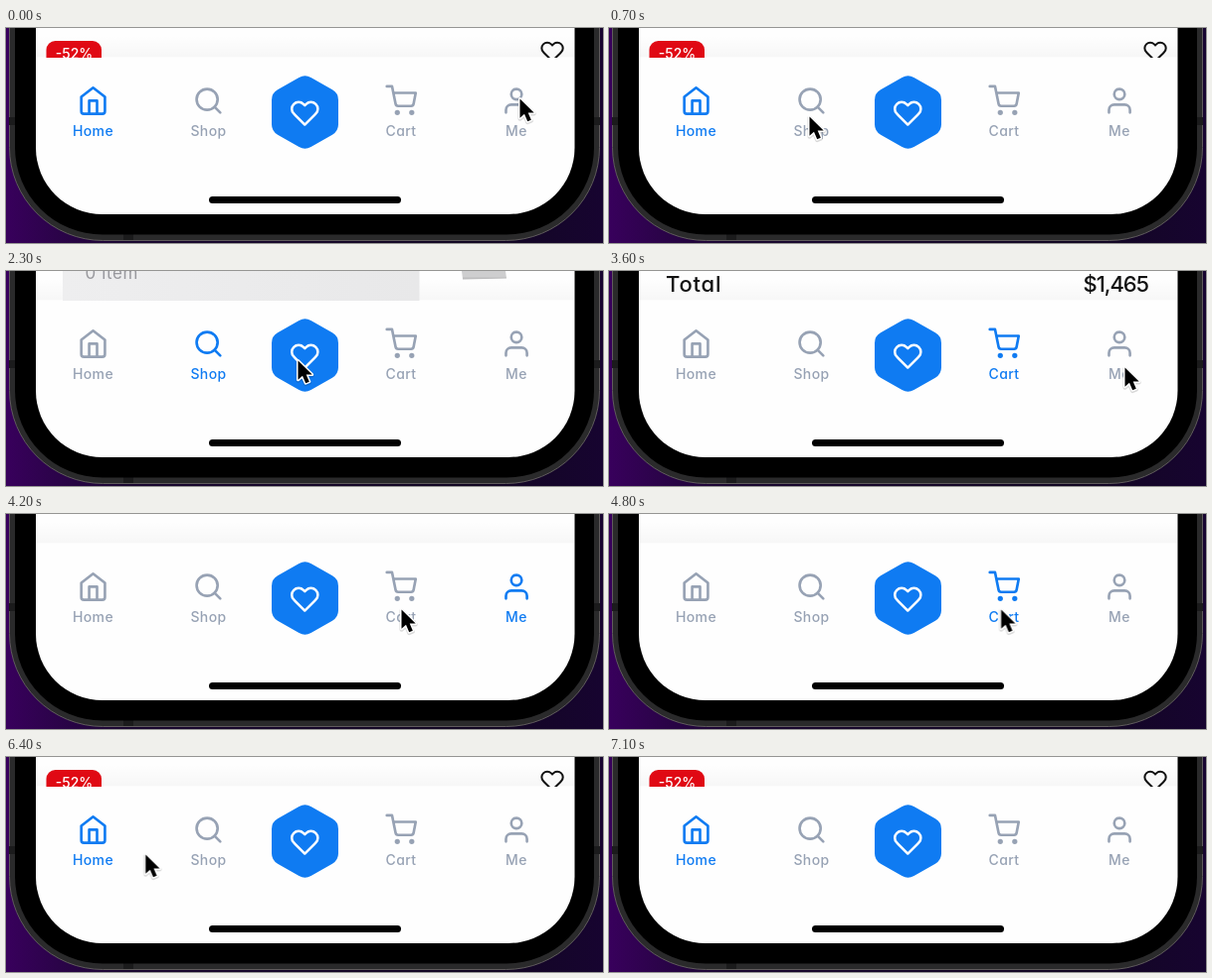
An HTML page for the animation above (8000 ms loop, 600 by 217 pixels).

```html
<!DOCTYPE html>
<html lang="en">
<head>
<meta charset="utf-8">
<title>Tab bar</title>
<style>
  html, body { margin: 0; width: 100%; height: 100%; overflow: hidden; background: #16062c; }
  svg { display: block; width: 600px; height: 217px; }
  text { font-family: Inter, Roboto, sans-serif; font-feature-settings: "cv11"; font-weight: 500; }

  .tab { --on: #0f7bf2; --off: #97a2b4; color: var(--off); animation: 8s step-end infinite; }
  .tab text { font-size: 14px; letter-spacing: .4px; text-anchor: middle; fill: currentColor; }
  .icon { fill: none; stroke: currentColor; stroke-width: 2; stroke-linecap: round; stroke-linejoin: round; }
  .view { animation: 8s step-end infinite; }

  .home { animation-name: home; }
  .shop { animation-name: shop; }
  .cart { animation-name: cart; }
  .me { animation-name: me; }
  @keyframes home { 0%, 77.5% { color: var(--on); } 11.25% { color: var(--off); } 100% { color: var(--on); } }
  @keyframes shop { 0%, 32.5%, 77.5%, 100% { color: var(--off); } 11.25%, 66.25% { color: var(--on); } }
  @keyframes cart { 0%, 46.25%, 66.25%, 100% { color: var(--off); } 32.5%, 55% { color: var(--on); } }
  @keyframes me { 0%, 55%, 100% { color: var(--off); } 46.25% { color: var(--on); } }

  .deals { animation-name: deals; }
  .list { animation-name: list; }
  .total { animation-name: total; }
  @keyframes deals { 0%, 77.5%, 100% { opacity: 1; } 11.25% { opacity: 0; } }
  @keyframes list { 0%, 32.5%, 77.5%, 100% { opacity: 0; } 13.75%, 67.5% { opacity: 1; } }
  @keyframes total { 0%, 46.25%, 100% { opacity: 0; } 37.5% { opacity: 1; } }

  /* The pointer moves ten times a second: one step per 100 ms of each leg. */
  .pointer { animation: travel 8s steps(1) infinite; }
  @keyframes travel {
    0% { transform: translate(515px, 68px); animation-timing-function: steps(7); }
    8.75% { transform: translate(200px, 86px); animation-timing-function: steps(2); }
    11.25% { transform: translate(192px, 83px); }
    22.5% { transform: translate(192px, 83px); animation-timing-function: steps(3); }
    26.25%, 27.5% { transform: translate(286px, 88px); }
    28.75% { transform: translate(292px, 87px); animation-timing-function: steps(3); }
    32.5% { transform: translate(394px, 92px); }
    36.25% { transform: translate(394px, 92px); animation-timing-function: steps(5); }
    42.5% { transform: translate(517px, 94px); }
    47.5% { transform: translate(517px, 94px); animation-timing-function: steps(3); }
    51.25% { transform: translate(400px, 93px); }
    52.5% { transform: translate(396px, 93px); animation-timing-function: steps(7); }
    61.25% { transform: translate(392px, 93px); animation-timing-function: steps(2); }
    63.75% { transform: translate(186px, 93px); }
    65% { transform: translate(186px, 93px); animation-timing-function: steps(4); }
    70% { transform: translate(144.5px, 88px); animation-timing-function: steps(3); }
    73.75% { transform: translate(75px, 92px); }
    78.75% { transform: translate(75px, 92px); animation-timing-function: steps(4); }
    83.75% { transform: translate(330px, 104px); animation-timing-function: steps(3); }
    87.5% { transform: translate(590px, 66px); }
    88.75%, 100% { transform: translate(630px, 60px); }
  }
</style>
</head>
<body>
<svg viewBox="0 0 600 217">
  <defs>
    <linearGradient id="wall">
      <stop offset="0" stop-color="#38005c"/>
      <stop offset=".2" stop-color="#1a0730"/>
      <stop offset=".8" stop-color="#120722"/>
      <stop offset="1" stop-color="#170430"/>
    </linearGradient>
    <linearGradient id="shade" x2="0" y2="1">
      <stop offset="0" stop-opacity="0"/>
      <stop offset="1" stop-opacity=".03"/>
    </linearGradient>
    <linearGradient id="card">
      <stop offset="0" stop-color="#eeeeef"/>
      <stop offset="1" stop-color="#e8e8e9"/>
    </linearGradient>
    <clipPath id="page"><rect x="30" width="541.5" height="29.5"/></clipPath>
    <path id="heart" d="M20.84 4.61a5.5 5.5 0 0 0-7.78 0L12 5.67l-1.06-1.06a5.5 5.5 0 0 0-7.78 7.78l1.06 1.06L12 21.23l7.78-7.78 1.06-1.06a5.5 5.5 0 0 0 0-7.78z"/>
    <path id="arrow" d="M1.5 3.5v19.3l4.5-4 3.2 7.4 3.6-1.5-3.1-7.200h6z"/>
  </defs>

  <!-- Phone -->
  <rect width="600" height="217" fill="url(#wall)"/>
  <rect x="3.5" y="-200" width="593" height="414.5" rx="94" fill="#2a2a2b" stroke="#5f5b5c"/>
  <path d="M3 90h6v8h-6zM591 90h6v8h-6zM118 208h10v6h-10z" fill="#1b1b1c"/>
  <rect x="9" y="-200" width="582" height="408.5" rx="88" fill="#000"/>
  <rect x="30" y="-200" width="541.5" height="388" rx="67" fill="#fefefe"/>

  <!-- Pages -->
  <g clip-path="url(#page)">
    <rect x="30" y="8" width="541.5" height="21.5" fill="url(#shade)"/>
    <g class="view deals">
      <rect x="40.5" y="13" width="55.5" height="28" rx="9" fill="#e00914"/>
      <text x="68.5" y="31" font-size="14" text-anchor="middle" fill="#fff">-52%</text>
      <use href="#heart" class="icon" color="#111" transform="translate(536.8 11.7) scale(1.02)"/>
    </g>
    <g class="view list">
      <rect x="57" y="-40" width="358.5" height="80" fill="url(#card)"/>
      <text x="79.5" y="7.5" font-size="17" letter-spacing=".6" style="font-weight:400" fill="#98989d">0 item</text>
      <path d="M458 0h44l1 7-44 1z" fill="#cececf"/>
      <path d="M459 6.5h44v1l-44 1z" fill="#bdbdbe"/>
    </g>
    <g class="view total" font-size="22" fill="#111">
      <text x="57" y="21" letter-spacing=".8">Total</text>
      <text x="542" y="21" text-anchor="end" letter-spacing="-1">$1,465</text>
    </g>
  </g>

  <!-- Tab bar -->
  <g class="tab home">
    <g class="icon" transform="translate(71.7 57.6) scale(1.32)">
      <path d="M3 9l9-7 9 7v11a2 2 0 0 1-2 2H5a2 2 0 0 1-2-2zM9 22V12h6v10"/>
    </g>
    <text x="87.5" y="108.5">Home</text>
  </g>
  <g class="tab shop">
    <g class="icon" transform="translate(187.6 57.6) scale(1.32)">
      <circle cx="11" cy="11" r="8"/><path d="M21 21l-4.35-4.35"/>
    </g>
    <text x="203.5" y="108.5">Shop</text>
  </g>
  <path d="M300.5 60.3L322 72.7v24.6l-21.5 12.4L279 97.3V72.700z" fill="#0f7bf2" stroke="#0f7bf2" stroke-width="24" stroke-linejoin="round"/>
  <use href="#heart" class="icon" color="#fff" transform="translate(285.3 71) scale(1.25)"/>
  <g class="tab cart">
    <g class="icon" transform="translate(381.4 57.6) scale(1.32)">
      <circle cx="9" cy="21" r="1"/><circle cx="20" cy="21" r="1"/>
      <path d="M1 1h4l2.68 13.39a2 2 0 0 0 2 1.61h9.72a2 2 0 0 0 2-1.61L23 6H6"/>
    </g>
    <text x="397" y="108.5">Cart</text>
  </g>
  <g class="tab me">
    <g class="icon" transform="translate(497.2 57.6) scale(1.32)">
      <circle cx="12" cy="7" r="4"/><path d="M20 21v-2a4 4 0 0 0-4-4H8a4 4 0 0 0-4 4v2"/>
    </g>
    <text x="513" y="108.5">Me</text>
  </g>
  <rect x="204" y="170" width="193" height="7" rx="3.5" fill="#000"/>

  <g class="pointer" stroke-linejoin="round">
    <use href="#arrow" y="1" fill="none" stroke="#000" stroke-opacity=".15" stroke-width="4"/>
    <use href="#arrow" fill="#000" stroke="#fff" stroke-width="3" paint-order="stroke"/>
  </g>
</svg>
</body>
</html>
```
